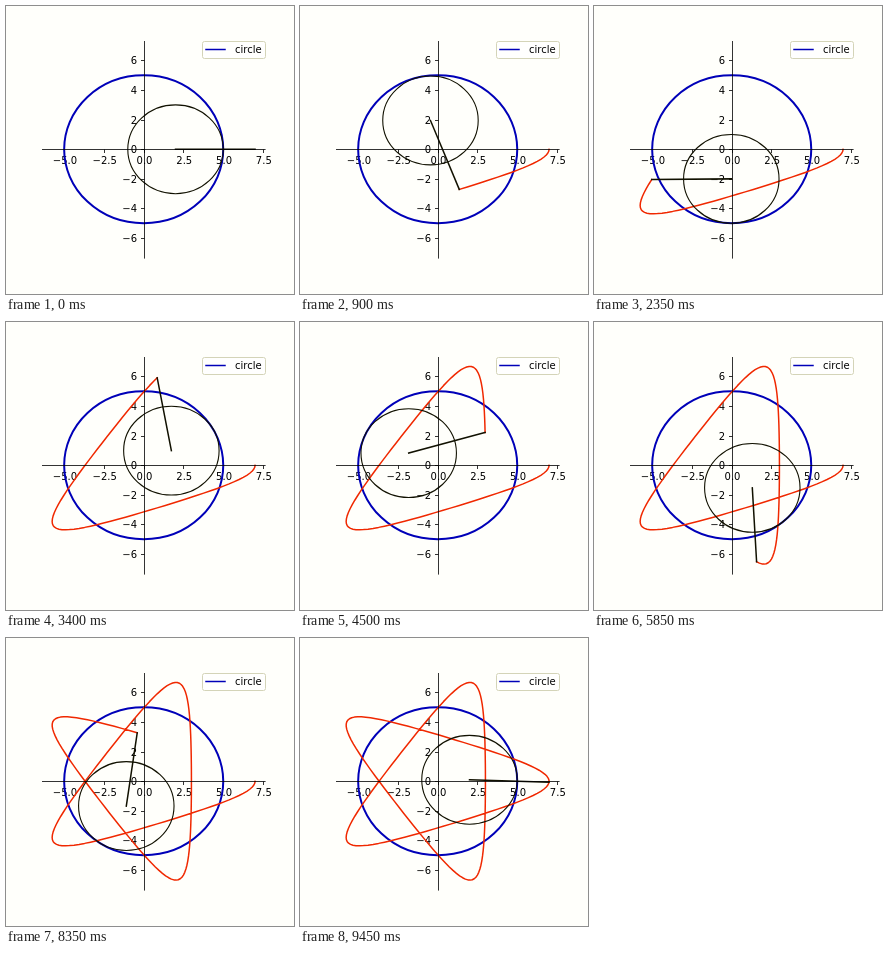
An HTML page for the animation above (9.5 s loop, 288 by 288 pixels).

```html
<!DOCTYPE html>
<html lang="en">
<head>
<meta charset="utf-8">
<title>Hypotrochoid</title>
<style>
  html, body { margin: 0; height: 100%; overflow: hidden; background: #fffffb; }
  svg { display: block; width: 100vw; height: 100vh; }
  text { font: 10px "DejaVu Sans", sans-serif; }
  .line { fill: none; stroke-width: 1.5; stroke-linejoin: round; stroke-linecap: square; }
  .blue { stroke: #0000b8; }
  .black { stroke: #110; }
  .axis { stroke: #000; stroke-width: .8; }
  #fixed { stroke-width: 2; }
  #rolling { stroke-width: 1.1; }
  #trace { stroke: #f02800; }
</style>
</head>
<body>
<svg viewBox="0 0 288 288">
  <g id="ticks"></g>
  <ellipse id="fixed" class="line blue"/>
  <polyline id="trace" class="line"/>
  <ellipse id="rolling" class="line black"/>
  <line id="arm" class="line black"/>
  <path class="axis" d="M36 143.5H259.6M138.5 35V252.6"/>
  <rect x="196.5" y="35.5" width="63" height="17" rx="2" fill="#fff" fill-opacity=".8" stroke="#d4d4b8"/>
  <path class="line blue" d="M200 43.5H219"/>
  <text x="229" y="47">circle</text>
</svg>
<script>
const R = 5, r = 3, d = 5;
const STEP_MS = 50, STEPS = 190, STEP = 0.1;
const X0 = 137.7, Y0 = 143.28, SX = 15.91, SY = 14.8;
const px = x => X0 + x * SX;
const py = y => Y0 - y * SY;
const snap = v => Math.round(v) + 0.5;

const $ = id => document.getElementById(id);
const set = (el, attrs) => {
  for (const key in attrs) el.setAttribute(key, attrs[key]);
};

function addTick(path, x, y, anchor, label) {
  $('ticks').insertAdjacentHTML('beforeend',
    `<path class="axis" d="${path}"/><text x="${x}" y="${y}" text-anchor="${anchor}">${label.replace('-', '−')}</text>`);
}
for (let x = -5; x <= 7.5; x += 2.5)
  addTick(`M${snap(px(x))} 143.5v3.5`, px(x) + 0.8, 158, 'middle', x.toFixed(1));
for (let y = -6; y <= 6; y += 2)
  addTick(`M138.5 ${snap(py(y))}h-3.5`, 131, Math.round(py(y) + 3.9), 'end', String(y));

const center = t => [(R - r) * Math.cos(t), (R - r) * Math.sin(t)];
function pen(t) {
  const [x, y] = center(t), a = (R - r) / r * t;
  return [x + d * Math.cos(a), y - d * Math.sin(a)];
}
const toPixels = ([x, y]) => [px(x), py(y)];
const points = Array.from({ length: STEPS }, (_, i) => toPixels(pen(i * STEP)));

set($('fixed'), { cx: X0, cy: Y0, rx: R * SX, ry: R * SY });
set($('rolling'), { rx: r * SX, ry: r * SY });

function draw(now) {
  const i = Math.floor(now / STEP_MS) % STEPS;
  const [cx, cy] = toPixels(center(i * STEP));
  const [x2, y2] = points[i];
  set($('rolling'), { cx, cy });
  set($('arm'), { x1: cx, y1: cy, x2, y2 });
  set($('trace'), { points: i ? points.slice(0, i + 1).join(' ') : '' });
}

const start = performance.now();
function tick() {
  draw(performance.now() - start);
  requestAnimationFrame(tick);
}
tick();
</script>
</body>
</html>
```
